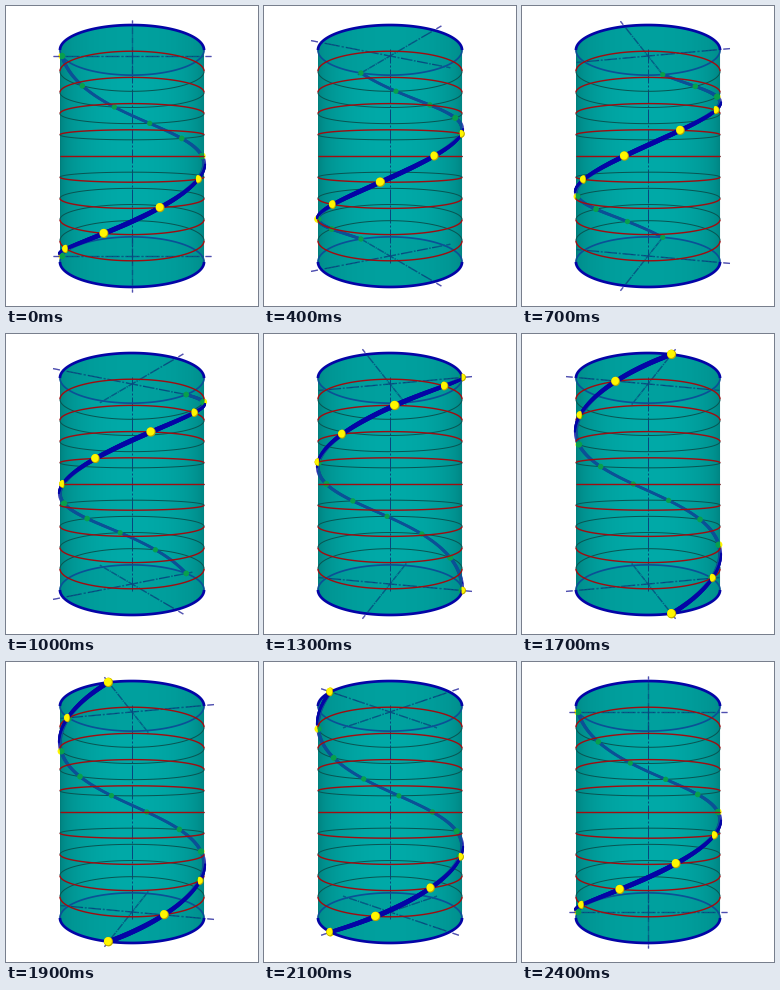
A matplotlib script for the animation above (2.5 s loop, 252 by 300 pixels).

```python
import numpy as np
import matplotlib.pyplot as plt
from matplotlib.animation import FuncAnimation
from matplotlib.collections import LineCollection
from matplotlib.patches import Circle, Polygon

W, H, DPI = 252, 300, 100
PX = 72 / DPI
CX, CY = W / 2, H / 2
R, HALF, DIST = 70, 100, 296
AXIS = 79
SPLIT = np.arcsin(R / DIST)         # angle where the wall turns out of sight
EDGE_DEPTH = -R * R / DIST
OUTLINE = R / np.cos(SPLIT)
NEAR = (np.pi + SPLIT, 2 * np.pi - SPLIT)
FAR = (-SPLIT, np.pi + SPLIT)
STEPS, TURN = 25, np.pi / 12

BLUE, BLUE_IN = "#0404a6", "#0b5096"
RED, RED_IN = "#a00c10", "#0a5452"
AXIS_OUT, AXIS_IN = "#161696", "#08467e"
YELLOW, YELLOW_EDGE, GREEN = "#fff600", "#c0a800", "#08a04c"

fig = plt.figure(figsize=(W / DPI, H / DPI), dpi=DPI, facecolor="white")
ax = fig.add_axes([0, 0, 1, 1])
ax.axis("off")
ax.set_xlim(0, W)
ax.set_ylim(H, 0)


def project(x, depth, y):
    s = DIST / (DIST + depth)
    return CX + x * s, CY + y * s, s


def around(phi, radius=R):
    """Lateral offset and depth, counted from the left through the back."""
    return -radius * np.cos(phi), radius * np.sin(phi)


def arc(y, a, b):
    px, py, _ = project(*around(np.linspace(a, b, 120)), y)
    return np.column_stack([px, py])


def segments(x, y):
    pts = np.column_stack([x, y])
    return np.stack([pts[:-1], pts[1:]], axis=1)


def strokes(segs, width, color, z, cap="butt"):
    lines = LineCollection(segs, linewidths=np.asarray(width) * PX, colors=color,
                           capstyle=cap, zorder=z)
    return ax.add_collection(lines, autolim=False)


def ring(y, front, back):
    """Circle at height y; each style is (color, width, zorder)."""
    for span, (color, width, z) in ((NEAR, front), (FAR, back)):
        ax.plot(*arc(y, *span).T, color=color, lw=width * PX, zorder=z,
                solid_capstyle="butt")


def draw_body():
    u = np.linspace(-1, 1, 160)
    glow = (1 - u ** 2)[:, None] ** 0.5
    shade = np.array([0, 126, 124]) + glow * np.array([0, 44, 44])
    wall = ax.imshow(shade[None] / 255, aspect="auto", zorder=1,
                     extent=(CX - OUTLINE, CX + OUTLINE, H, 0))
    shape = np.vstack([arc(-HALF, *NEAR), arc(HALF, *NEAR)[::-1]])
    clip = ax.add_patch(Polygon(shape, fc="none", ec="none"))
    wall.set_clip_path(clip)
    for y in (-HALF, HALF):
        ax.add_patch(Polygon(arc(y, 0, 2 * np.pi), fc="#009694",
                             ec="none", alpha=0.45, zorder=1.5))
        ring(y, (BLUE, 2.7, 7), (BLUE_IN, 1.7, 3))
    for y in range(-80, 81, 20):
        ring(y, (RED, 1.4, 6), (RED_IN, 1, 3))
    return clip


def dashes(length):
    """Dash-dot pieces along a centre line, symmetric about its middle."""
    spans = [(-7, 7)]
    for start in np.arange(9, length, 20):
        for a, b in ((start, start + 2), (start + 4, start + 18)):
            if a < length:
                b = min(b, length)
                spans += [(a, b), (-b, -a)]
    return spans


def cross_line(phi, y):
    for a, b in dashes(AXIS):
        t = np.linspace(a, b, 12)
        x, depth = around(phi, t)
        px, py, _ = project(x, depth, y)
        segs = segments(px, py)
        mid_t, mid_depth = np.abs(t[:-1] + t[1:]) / 2, (depth[:-1] + depth[1:]) / 2
        mid_x = segs[:, :, 0].mean(axis=1)
        free = ((mid_t > R) & (mid_depth < EDGE_DEPTH)) | (abs(mid_x - CX) > OUTLINE)
        for mask, color, z in ((free, AXIS_OUT, 8), (~free, AXIS_IN, 2.5)):
            if mask.any():
                moving.append(strokes(segs[mask], 1.3, color, z))


def facing(x, depth):
    """Cosine between the wall's normal and the line of sight."""
    cos = (-depth * DIST - R * R) / (R * np.hypot(x, depth + DIST))
    return np.clip(cos, 0, 1)


def add(patch, clip=None):
    moving.append(ax.add_patch(patch))
    if clip is not None:
        patch.set_clip_path(clip)


def cap_outline(x, y, r, cos, side):
    """Part of a ball standing out of the wall, flattened on its inner side."""
    a = np.linspace(0, 2 * np.pi, 60)
    dx = side * r * np.cos(a) * np.where(np.cos(a) < 0, cos, 1)
    return np.column_stack([x + dx, y + r * np.sin(a)])


def ball(x, y, s, cos):
    r = 3.6 * s
    add(Circle((x, y), r, fc=YELLOW, ec="none", zorder=0.6))
    add(Circle((x, y), 0.9 * r, fc=GREEN, ec="none", zorder=4 + s / 2), body)
    if cos > 0:
        side = 1 if x > CX else -1
        add(Polygon(cap_outline(x, y, r, cos, side), fc=YELLOW_EDGE,
                    ec="none", zorder=10 + s))
        add(Polygon(cap_outline(x - 0.1 * r, y - 0.1 * r, 0.87 * r, cos, side),
                    fc=YELLOW, ec="none", zorder=10.001 + s))


def helix(start):
    t = np.linspace(0, 1, 301)
    x, depth = around(start + 2 * np.pi * t)
    px, py, s = project(x, depth, HALF * (2 * t - 1))
    cos = facing(x, depth)
    width = 3.8 * s
    segs = segments(px, py)
    moving.append(strokes(segs, width[:-1], BLUE, 0.5))
    inner = strokes(segs, 0.9 * width[:-1], BLUE_IN, 4, "round")
    inner.set_clip_path(body)
    moving.append(inner)

    # the half sunk into the wall is hidden, so the tube narrows at the sides
    outer = segments(px + np.sign(x) * width * (1 - cos) / 4, py)
    front = (cos[:-1] > 0) & (cos[1:] > 0)
    thick = (width * (1 + cos) / 2)[:-1]
    moving.append(strokes(outer[front], thick[front], BLUE, 9, "round"))
    for k in range(0, 301, 30):
        ball(px[k], py[k], s[k], cos[k])


body = draw_body()
for a, b in dashes(109):
    strokes([[(CX, CY + a), (CX, CY + b)]], 1, AXIS_IN, 2.5)
ax.set_xlim(0, W)
ax.set_ylim(H, 0)
moving = []


def update(i):
    while moving:
        moving.pop().remove()
    start = i * TURN
    for y in (-HALF, HALF):
        cross_line(start, y)
        cross_line(start + np.pi / 2, y)
    helix(start)
    return moving


anim = FuncAnimation(fig, update, frames=STEPS, init_func=lambda: update(0),
                     interval=100, repeat=True, repeat_delay=0, blit=False)
plt.show()
```
